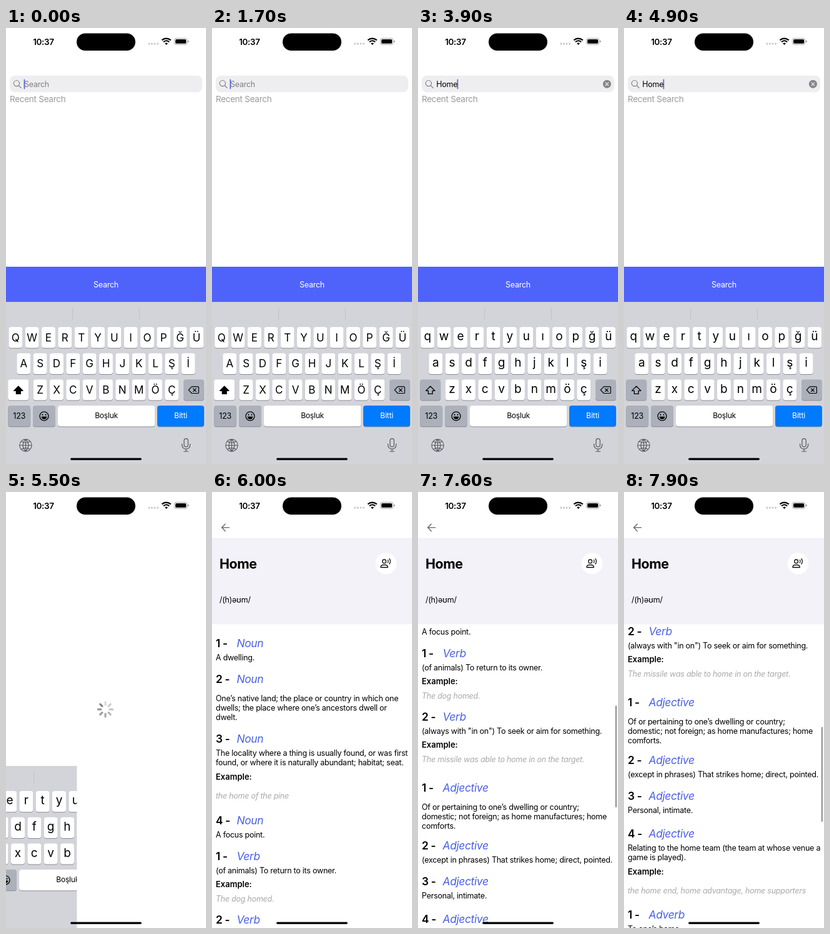
Write an HTML page that moves like this. It is 320 px wide and 694 px high and loops after 8 s.

```html
<!DOCTYPE html>
<html lang="en">
<head>
<meta charset="utf-8">
<title>Dictionary search</title>
<style>
html, body { margin: 0; width: 100%; height: 100%; overflow: hidden; background: #fff; }
svg { display: block; width: 320px; height: 694px; font-family: Inter, "Noto Sans", sans-serif; }
text { letter-spacing: -.02em; white-space: pre; }
.body { font-size: 12.5px; }
.num { font-size: 17.4px; font-weight: 600; }
.pos { font-size: 17.4px; font-style: italic; fill: #4a60e8; }
.ex { font-size: 13px; font-weight: 600; letter-spacing: 0; }
.quote { font-size: 12.5px; font-style: italic; fill: #a9a9ab; }
.mid { text-anchor: middle; }
.key { text-anchor: middle; letter-spacing: 0; }
.line { fill: none; stroke-linecap: round; stroke-linejoin: round; }
</style>
</head>
<body>
<svg id="stage" viewBox="0 0 320 694"></svg>
<script>
const LOOP = 8000, STEP = 100;
const INK = '#000', GREY = '#808085';

const rect = (x, y, w, h, r, fill, more = '') =>
  `<rect x="${x}" y="${y}" width="${w}" height="${h}" rx="${r}" fill="${fill}" ${more}/>`;
const text = (x, y, s, cls, more = '') => `<text x="${x}" y="${y}" class="${cls}" ${more}>${s}</text>`;
const line = (d, color, w, more = '') =>
  `<path class="line" d="${d}" stroke="${color}" stroke-width="${w}" ${more}/>`;
const circle = (x, y, r, fill, more = '') => `<circle cx="${x}" cy="${y}" r="${r}" fill="${fill}" ${more}/>`;
const group = (id, s, more = '') => `<g id="${id}" ${more}>${s}</g>`;

// ---- keyboard ----
const ROWS = [
  { x: 15.3, y: 476, low: 'qwertyuıopğü', up: 'QWERTYUIOPĞÜ' },
  { x: 28.3, y: 517.7, low: 'asdfghjklşi', up: 'ASDFGHJKLŞİ' },
  { x: 54.6, y: 559.4, low: 'zxcvbnmöç', up: 'ZXCVBNMÖÇ' }
];
const PITCH = 26.33, KEY_H = 33.2;

const cap = (x, y, w, fill) =>
  rect(x, y + 1, w, KEY_H, 4, '#8b8d92') + rect(x, y, w, KEY_H, 4, fill);

function letters(kind) {
  const big = kind === 'up';
  return ROWS.map(r => [...r[kind]].map((c, i) =>
    text(r.x + i * PITCH, r.y + (big ? 22.6 : 21.3), c, 'key', `font-size="${big ? 17 : 19}"`)
  ).join('')).join('');
}

function shift(filled) {
  const arrow = 'M19.8 570.2L12.6 577.4H16.4V582.4H23.2V577.4H27Z';
  return cap(3.2, 559.4, 33, filled ? '#fff' : '#abb0ba') +
    line(arrow, INK, 1.3, filled ? 'style="fill:#000"' : '');
}

function emoji() {
  return circle(61, 617.8, 7, 'none', 'stroke="#000" stroke-width="1.3"') +
    circle(58.5, 615.6, 1.1, INK) + circle(63.5, 615.6, 1.1, INK) +
    '<path d="M56.6 618.6H65.4A4.4 4.2 0 0 1 56.6 618.6Z"/>';
}

function keyboard() {
  const c = '#54575d';
  let s = rect(0, 436, 320, 258, 0, '#d2d4da') +
    rect(106, 445, 1, 19, 0, '#bfc2c8') + rect(213, 445, 1, 19, 0, '#bfc2c8');
  for (const r of ROWS)
    for (let i = 0; i < r.low.length; i++) s += cap(r.x + i * PITCH - 11, r.y, 22, '#fff');
  s += group('upper', letters('up') + shift(true)) + group('lower', letters('low') + shift(false));
  s += cap(284, 559.4, 33, '#abb0ba') +
    line('M292.2 576.2L297.2 570.9H307Q308.3 570.9 308.3 572.2V580.2Q308.3 581.5 307 581.5H297.2ZM299.4 573.8L304.2 578.6M304.2 573.8L299.4 578.6', INK, 1.2);
  s += cap(3.2, 601, 36, '#abb0ba') + text(21.2, 622, '123', 'mid', 'font-size="12.6"') +
    cap(43, 601, 36, '#abb0ba') + emoji() +
    cap(83, 601, 155.3, '#fff') + text(160.6, 621, 'Boşluk', 'mid', 'font-size="12.1"') +
    cap(242, 601, 75, '#007aff') + text(279.5, 621, 'Bitti', 'mid', 'font-size="12.3" fill="#fff"');
  s += line('M21.8 664.2A9.7 9.7 0 1 0 41.2 664.2A9.7 9.7 0 1 0 21.8 664.2H41.2M31.5 654.5V673.9M31.5 654.5Q22.5 664.2 31.5 673.9M31.5 654.5Q40.5 664.2 31.5 673.9M24.3 657.9Q31.5 662 38.7 657.9M24.3 670.5Q31.5 666.4 38.7 670.5', c, 1.1);
  s += rect(284.9, 653.6, 6.4, 13, 3.2, 'none', `stroke="${c}" stroke-width="1.2"`) +
    line('M281.6 662V664A6.5 6.2 0 0 0 294.6 664V662M288.1 670.4V674M284.6 674H291.6', c, 1.2);
  return s;
}

// Enlarged key shown while a finger is down
function popup(c) {
  const r = ROWS.find(q => q.low.includes(c) || q.up.includes(c));
  const big = r.up.includes(c);
  const i = [...(big ? r.up : r.low)].indexOf(c);
  const x = r.x + i * PITCH, y = r.y;
  const d = `M${x - 12.5} ${y - 45.5}h25q8 0 8 8v24.5c0 9 -9.5 9 -9.5 18v24.2q0 4 -4 4h-14q-4 0 -4 -4v-24.2c0 -9 -9.5 -9 -9.5 -18v-24.5q0 -8 8 -8z`;
  return `<path d="${d}" fill="#fff" filter="url(#soft)"/>` +
    text(x, y - (big ? 13.5 : 15.5), c, 'key', `font-size="${big ? 25 : 28}"`);
}

// ---- search page ----
function searchPage() {
  return rect(6, 75.7, 308, 26.6, 8, '#eeeef0') +
    circle(16.9, 88.1, 4.6, 'none', `stroke="${GREY}" stroke-width="1.2"`) +
    line('M20.4 91.6L24 95.2', GREY, 1.3) +
    text(29, 93.8, 'Search', 'body', `id="hint" fill="${GREY}"`) +
    text(29.3, 93.8, '', 'body', 'id="typed"') +
    group('clear', circle(302.4, 89.2, 6.5, '#858589') +
      line('M300 86.8L304.8 91.6M304.8 86.8L300 91.6', '#f2f2f3', 1.2)) +
    rect(0, 81.4, 1.6, 16, .8, '#4a60d8', 'id="caret"') +
    text(6, 118, 'Recent Search', '', 'font-size="13.5" fill="#9a9a9c"') +
    rect(0, 380, 320, 56.5, 0, '#4f63fb') +
    text(160, 413, 'Search', 'body mid', 'id="label" fill="#fff"');
}

// ---- result page: heading y, number, part of speech, definition lines, example ----
const ENTRIES = [
  [241, 1, 'Noun', ['A dwelling.']],
  [298, 2, 'Noun', ['One’s native land; the place or country in which one',
    'dwells; the place where one’s ancestors dwell or', 'dwelt.']],
  [393, 3, 'Noun', ['The locality where a thing is usually found, or was first',
    'found, or where it is naturally abundant; habitat; seat.'], 'the home of the pine'],
  [523, 4, 'Noun', ['A focus point.']],
  [580, 1, 'Verb', ['(of animals) To return to its owner.'], 'The dog homed.'],
  [681, 2, 'Verb', ['(always with "in on") To seek or aim for something.'],
    'The missile was able to home in on the target.'],
  [794, 1, 'Adjective', ['Of or pertaining to one’s dwelling or country;',
    'domestic; not foreign; as home manufactures; home', 'comforts.']],
  [886, 2, 'Adjective', ['(except in phrases) That strikes home; direct, pointed.']],
  [943, 3, 'Adjective', ['Personal, intimate.']],
  [1003, 4, 'Adjective', ['Relating to the home team (the team at whose venue a',
    'game is played).'], 'the home end, home advantage, home supporters'],
  [1132, 1, 'Adverb', ['To one’s home']]
];

function entry([y, n, pos, lines, quote]) {
  let s = text(6, y + 6.3, n + ' -', 'num') + text(39.5, y + 6.3, pos, 'pos');
  y += (lines.length > 2 ? 30.3 : 22.6) + 4.4;
  lines.forEach((l, i) => { s += text(6, y + i * 15.2, l, 'body'); });
  if (quote) {
    y += (lines.length - 1) * 15.2 + 22.4;
    s += text(6, y, 'Example:', 'ex') + text(6, y + (lines.length > 1 ? 30.3 : 22.4), quote, 'quote');
  }
  return s;
}

function resultPage() {
  return line('M27.6 56.6H15.8M21.2 51L15.6 56.6L21.2 62.2', '#66666a', 1.4) +
    rect(0, 73, 320, 137.5, 0, '#f2f2f8') +
    text(12, 122.3, 'Home', '', 'font-size="21.4" font-weight="700"') +
    text(12, 176, '/(h)əʊm/', 'body') +
    circle(278.5, 114, 17, '#fff') +
    circle(275.6, 110.4, 2.9, 'none', 'stroke="#111" stroke-width="1.3"') +
    line('M270 120V118.6Q270.6 116 275.6 116T281.2 118.6V120Z', '#111', 1.3) +
    line('M281.4 108.2Q282.8 110.4 281.4 112.6M283.8 106.2Q287 110.4 283.8 114.6', '#111', 1.3) +
    `<g clip-path="url(#view)">${group('list', ENTRIES.map(entry).join(''))}</g>` +
    rect(315.6, 0, 2.5, 0, 1.25, '#98989a', 'id="bar"');
}

function spinner() {
  let s = '';
  for (let i = 0; i < 8; i++)
    s += `<path class="line spoke" d="M0 -7.2V-11.6" stroke="#85858a" stroke-width="3.2" transform="rotate(${i * 45})"/>`;
  return s;
}

function status() {
  let s = text(60, 26.6, '10:37', 'mid', 'font-size="13.4" font-weight="600"') +
    rect(113, 8.5, 94, 27.5, 13.75, INK);
  for (let i = 0; i < 4; i++) s += circle(228.8 + i * 4.6, 25, 1.5, '#c4c4c6');
  return s +
    '<path d="M256.6 27L254.2 24.4Q256.6 22.6 259 24.4Z"/>' +
    '<path fill="none" stroke="#000" stroke-width="2" d="M252 22.2Q256.6 18.4 261.2 22.2M249.4 19.4Q256.6 13.8 263.8 19.4"/>' +
    rect(269.4, 16.4, 20.4, 10, 3.2, 'none', 'stroke="#000" stroke-opacity=".4" stroke-width=".9"') +
    rect(271, 18, 17.2, 6.8, 1.9, INK) +
    '<path d="M291 19.8Q292.6 20.2 292.6 21.4T291 23Z" opacity=".45"/>';
}

document.getElementById('stage').innerHTML =
  `<defs><clipPath id="view"><rect y="210.5" width="320" height="484"/></clipPath>
  <filter id="soft" x="-30%" y="-30%" width="160%" height="160%"><feDropShadow dx="0" dy=".6" stdDeviation="1.3" flood-color="#000" flood-opacity=".3"/></filter></defs>` +
  rect(0, 0, 320, 694, 0, '#fff') +
  group('search', searchPage()) + group('keys', keyboard()) + group('pop', '') +
  rect(0, 0, 320, 694, 0, '#fff', 'id="cover"') +
  group('result', resultPage()) + group('spin', spinner(), 'transform="translate(159 346)"') +
  status() + rect(103, 684.4, 114, 3.4, 1.7, INK);

const $ = id => document.getElementById(id);
const show = (id, on) => $(id).setAttribute('display', on ? 'inline' : 'none');
const spokes = document.querySelectorAll('.spoke');

// Piecewise linear curve through [x, y] points, flat outside them
function curve(x, pts) {
  if (x <= pts[0][0]) return pts[0][1];
  for (let i = 1; i < pts.length; i++) {
    const [a, p] = pts[i - 1], [b, q] = pts[i];
    if (x <= b) return p + (q - p) * (x - a) / (b - a);
  }
  return pts[pts.length - 1][1];
}

const PRESSES = [['H', 1900, 2000], ['o', 2500, 2600], ['m', 3100, 3200], ['e', 3700, 3900]];
const CARET_X = [28.6, 38.2, 44.6, 55.8, 62.6];
const BLINK = [[100, 1], [300, 0], [500, 0], [700, 1], [1100, 1], [1300, 0], [1400, 0], [1700, 1],
  [4400, 1], [4600, 0], [4700, 0], [4900, 1]];
const PUSH = 5400, LOADED = 6000, SCROLL = 7200;

function drawSearch(t) {
  const typed = PRESSES.filter(p => t >= p[2]).map(p => p[0]).join('');
  const down = PRESSES.find(p => t >= p[1] && t < p[2]);
  const n = typed.length;
  $('typed').textContent = typed;
  $('pop').innerHTML = down ? popup(down[0]) : '';
  show('hint', !n);
  show('clear', n);
  show('upper', !n);
  show('lower', n);
  $('caret').setAttribute('x', CARET_X[n]);
  $('caret').setAttribute('opacity', curve(t, BLINK));
  $('label').setAttribute('opacity', curve(t, [[4600, 1], [4700, .3], [4900, 1]]));
}

function drawPush(t) {
  const x = Math.max(0, t - PUSH + 20) * 2.2 / 120;
  const p = t < PUSH ? 0 : 1 - (1 + x) * Math.exp(-x);
  $('keys').setAttribute('transform', `translate(${-96 * p} 0)`);
  $('cover').setAttribute('x', 320 * (1 - p));
  const turn = 7 + Math.floor((t - PUSH) / 125);
  spokes.forEach((s, i) => s.setAttribute('opacity', 1 - .1 * ((turn - i + 16) % 8)));
}

function drawResult(t) {
  const y = t < SCROLL ? 0 : 57 + 758 * (1 - Math.exp(-.00108 * (t - SCROLL)));
  $('list').setAttribute('transform', `translate(0 ${-y})`);
  $('bar').setAttribute('y', curve(y, [[57, 253], [323, 340], [459, 374]]));
  $('bar').setAttribute('height', curve(y, [[57, 188], [323, 162], [459, 151]]));
  show('bar', t >= SCROLL);
}

function draw(ms) {
  const t = Math.floor(ms % LOOP / STEP) * STEP;
  show('search', t < PUSH);
  show('keys', t < LOADED);
  show('cover', t >= PUSH);
  show('spin', t >= PUSH && t < LOADED);
  show('result', t >= LOADED);
  drawSearch(t);
  drawPush(t);
  drawResult(t);
}

const start = performance.now();
function tick() {
  draw(performance.now() - start);
  requestAnimationFrame(tick);
}
tick();
</script>
</body>
</html>
```
